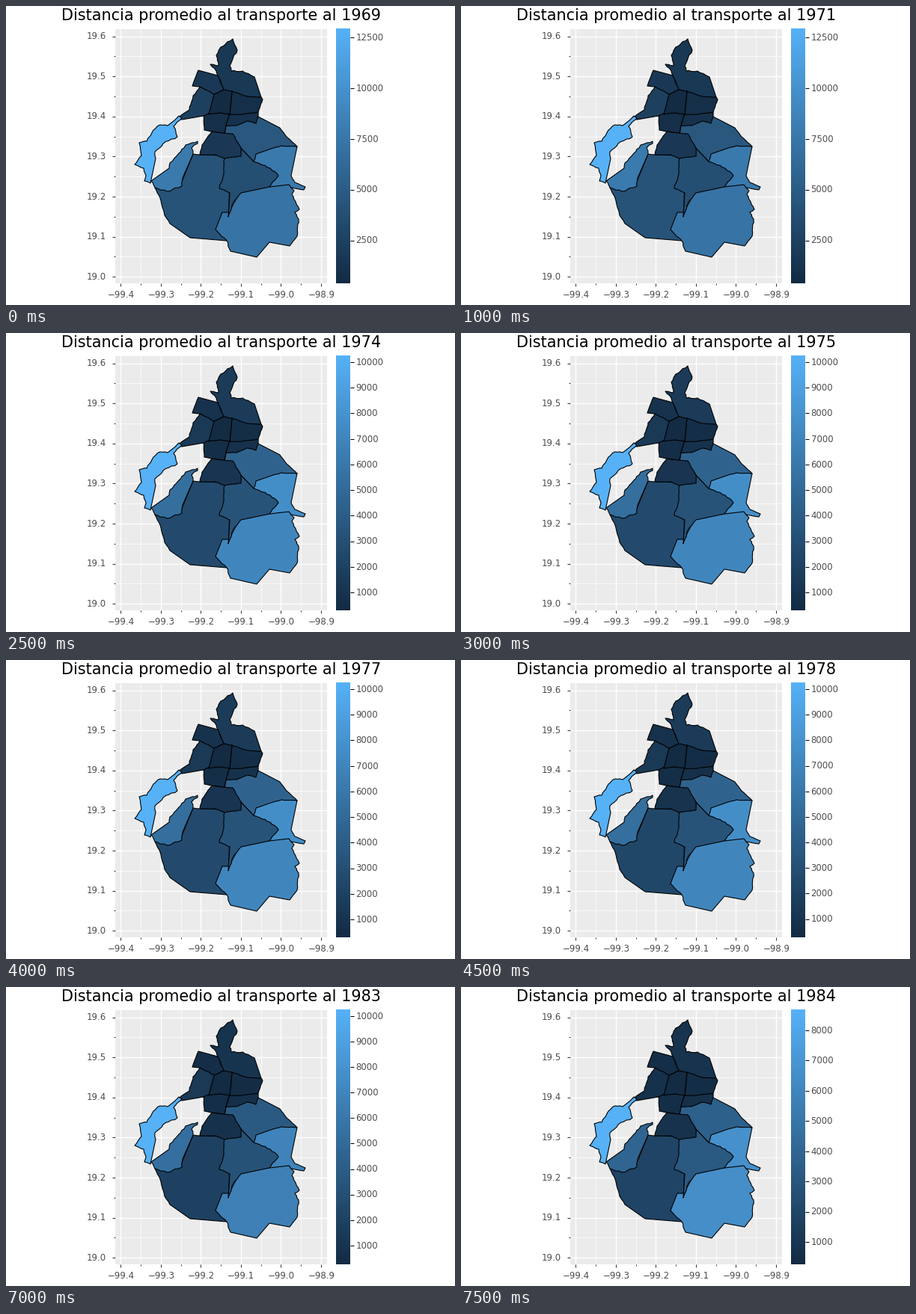
A matplotlib script for the animation above (8000 ms loop, 600x400 px).

```python
import math
import random
import numpy as np
import matplotlib.pyplot as plt
from matplotlib.animation import FuncAnimation
from matplotlib.collections import LineCollection
from matplotlib.colors import LinearSegmentedColormap

W, H, DPI = 600, 400, 100
PX = 72 / DPI
LEFT, RIGHT, TOP, BOTTOM = 145.5, 429, 30.5, 371
BAR_L, BAR_R = 441, 460
FIRST_YEAR = 1969
BLUES = LinearSegmentedColormap.from_list("blues", ["#132b43", "#56b1f7"])

random.seed(4)
plt.rcParams["font.family"] = "DejaVu Sans"
fig = plt.figure(figsize=(W / DPI, H / DPI), dpi=DPI, facecolor="white")
ax = fig.add_axes([0, 0, 1, 1])
ax.axis("off")


def strokes(lines, color, width, z):
    coll = LineCollection(lines, colors=color, linewidths=width * PX, zorder=z)
    ax.add_collection(coll)
    return coll


def label(x, y, text, ha):
    return ax.text(x, y, text, ha=ha, va="baseline", size=11.8 * PX, color="#4d4d4d")


# Panel, grid and axes
ax.fill([LEFT, RIGHT, RIGHT, LEFT], [TOP, TOP, BOTTOM, BOTTOM], color="#ebebeb", lw=0, zorder=0)

for k in range(13):
    width, tick = (0.7, 2) if k % 2 else (1.4, 4)
    y = 362.1 - 26.8 * k
    strokes([[(LEFT, y), (RIGHT, y)]], "white", width, 1)
    strokes([[(LEFT - tick, y), (LEFT, y)]], "#333333", 1, 1)
    if k % 2 == 0:
        label(134, y + 3.7, f"{19 + k / 20:.1f}", "right")
    if k < 11:
        x = 153.3 + 26.75 * k
        strokes([[(x, TOP), (x, BOTTOM)]], "white", width, 1)
        strokes([[(x, BOTTOM), (x, BOTTOM + tick)]], "#333333", 1, 1)
        if k % 2 == 0:
            label(x + 0.5, 389.8, f"\u2212{99.4 - k / 20:.1f}", "center")


# Districts: later ones cover the overlap of earlier ones, so each border is drawn once
def rough(points, wiggle):
    out = []
    for (x0, y0), (x1, y1) in zip(points, points[1:] + points[:1]):
        length = math.hypot(x1 - x0, y1 - y0)
        steps = round(length / 4) if length < 24 else 1
        for k in range(steps):
            amp = wiggle if k else 0
            out.append((x0 + (x1 - x0) * k / steps + random.uniform(-amp, amp),
                        y0 + (y1 - y0) * k / steps + random.uniform(-amp, amp)))
    return out


# Share of the total fall in distance reached in each period
STARTS = (1969, 1972, 1978, 1981, 1982, 1984)
WEST = (0, .63, .63, .63, .63, 1)
CORE = (0, .67, .78, .89, .97, 1)
EAST = (0, .10, .10, .75, .80, 1)
districts = []


def district(first, last, pace, wiggle, *points):
    patch, = ax.fill(*zip(*rough(list(points), wiggle)), ec="black", lw=1.1 * PX,
                     joinstyle="round", zorder=3)
    districts.append((patch, [first + (last - first) * p for p in pace]))


district(4150, 1860, CORE, .4,
         (199, 243), (206, 257), (212, 280), (219, 291), (246, 310), (295, 314),
         (298, 278), (299, 200), (259, 199), (250, 198), (235, 235))
district(7100, 6490, EAST, .7,
         (295, 314), (300, 328), (335, 336), (352, 316), (379, 321), (389, 308), (391, 285),
         (386, 276), (392, 272), (382, 252), (385, 247), (381, 243), (378, 236), (314, 246),
         (298, 276), (289, 276), (280, 299))
district(7720, 6610, EAST, .3,
         (389, 188), (381, 227), (386, 236), (400, 242), (398, 246), (381, 243), (378, 239),
         (352, 242), (345, 220), (331, 208), (331, 188), (368, 184))
district(3650, 3160, CORE, .8,
         (292, 204), (314, 190), (331, 208), (353, 217), (364, 227), (352, 242), (314, 250),
         (303, 264), (297, 282), (299, 250), (285, 244), (291, 225))
district(7780, 3900, WEST, .9,
         (256, 181), (240, 186), (231, 197), (219, 210), (218, 217), (194, 234), (199, 243),
         (215, 248), (235, 241), (236, 230), (250, 198), (248, 190), (256, 184))
district(4520, 3580, EAST, .4,
         (295, 155), (337, 148), (366, 163), (375, 175), (389, 188), (368, 187), (357, 190),
         (334, 198), (331, 208), (314, 190), (292, 170))
district(1640, 720, CORE, .4,
         (275, 168), (292, 170), (303, 171), (314, 190), (314, 201), (292, 204), (280, 199),
         (259, 199), (262, 186))
district(2390, 680, WEST, .8,
         (259, 108), (285, 118), (283, 143), (264, 147), (235, 152), (229, 149), (245, 139),
         (250, 120))
district(1600, 760, EAST, .8,
         (303, 44), (309, 59), (299, 80), (301, 87), (316, 87), (332, 95), (341, 122),
         (300, 125), (291, 112), (283, 93), (281, 87), (273, 78), (284, 80), (281, 66),
         (287, 55))
district(1640, 470, CORE, .4,
         (257, 86), (283, 93), (291, 112), (278, 118), (259, 108), (249, 107))
district(760, 470, CORE, .3,
         (264, 147), (272, 143), (299, 143), (294, 160), (292, 170), (275, 168), (265, 166))
district(1000, 600, CORE, .5,
         (299, 145), (337, 142), (337, 148), (334, 157), (322, 154), (308, 160), (294, 160))
district(760, 390, CORE, .4,
         (302, 114), (323, 121), (341, 122), (343, 125), (337, 142), (315, 145), (299, 145))
district(384, 258, CORE, .3,
         (278, 118), (291, 112), (302, 114), (299, 145), (285, 143), (271, 145))
district(12923, 8680, WEST, 1,
         (235, 150), (224, 161), (229, 175), (210, 184), (199, 195), (200, 204), (193, 237),
         (185, 234), (187, 227), (184, 217), (172, 212), (181, 200), (178, 183), (188, 181),
         (197, 166), (206, 159), (216, 160), (231, 147))

# Colour bar
ax.imshow(np.linspace(1, 0, 256)[:, None], cmap=BLUES, vmin=0, vmax=1, aspect="auto",
          extent=(BAR_L, BAR_R, BOTTOM, TOP), zorder=2)
bar_ticks = strokes([], "black", 1, 4)
bar_labels = [label(467.6, 0, "", "left") for _ in range(10)]
title = ax.text((LEFT + RIGHT) / 2, 18.9, "", ha="center", va="baseline",
                size=20.8 * PX, color="black")
ax.set_xlim(0, W)
ax.set_ylim(H, 0)


def update(i):
    year = FIRST_YEAR + i
    period = sum(year >= s for s in STARTS) - 1
    title.set_text(f"Distancia promedio al transporte al {year}")

    values = [distances[period] for _, distances in districts]
    low, high = min(values), max(values)
    for (patch, _), value in zip(districts, values):
        patch.set_facecolor(BLUES((value - low) / (high - low)))

    step = 2500 if high > 12000 else 1000
    lines = []
    for k, text in enumerate(bar_labels, 1):
        mark = k * step
        y = BOTTOM - (mark - low) / (high - low) * (BOTTOM - TOP)
        text.set_visible(mark <= high)
        if mark <= high:
            text.set_text(str(mark))
            text.set_y(y + 3.8)
            lines.append([(BAR_R - 0.5, y), (BAR_R + 4.5, y)])
    bar_ticks.set_segments(lines)
    return [title, bar_ticks, *bar_labels, *(p for p, _ in districts)]


anim = FuncAnimation(fig, update, frames=16, interval=500, repeat=True, repeat_delay=0)
plt.show()
```
